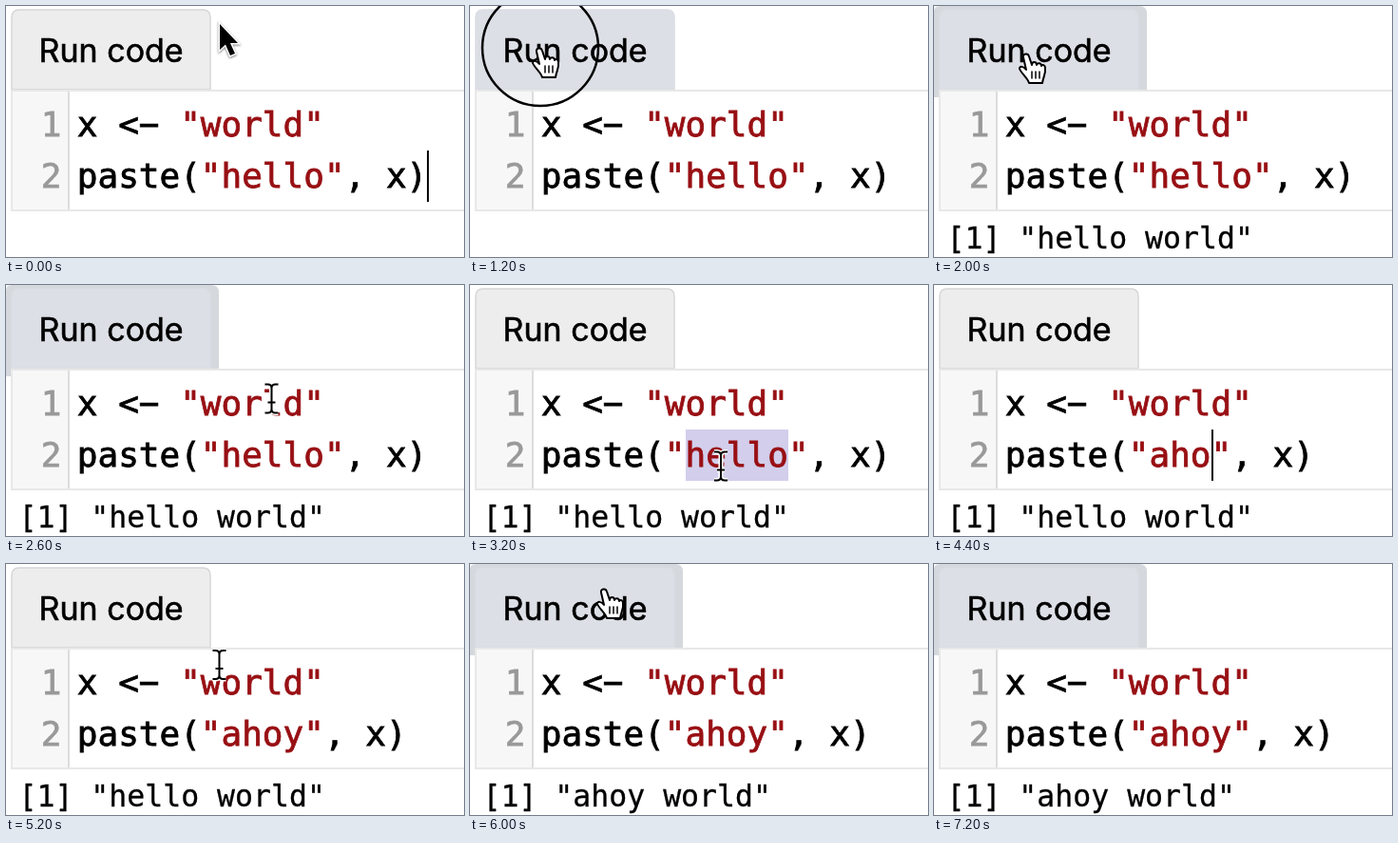
These frames come from a looping animation (482 px wide and 264 px high, 7.4 s). An HTML page:

```html
<!DOCTYPE html>
<html lang="en">
<head>
<meta charset="utf-8">
<title>Run code</title>
<style>
  html, body { margin: 0; width: 100%; height: 100%; overflow: hidden; background: #fff; }
  svg { display: block; width: 482px; height: 264px; }
  text { white-space: pre; font: 36px "DejaVu Sans Mono", monospace; stroke: #000; stroke-width: 0.8; }
  .label { font: 34px Inter, sans-serif; stroke-width: 0.6; }
  .num { fill: #999; stroke: #999; }
  .str { fill: #981014; stroke: #981014; }
  .out { font-size: 31.5px; stroke-width: 0.3; }
  .halo { fill: none; stroke: #fff; stroke-width: 5; }
  .line { fill: none; stroke: #000; stroke-width: 2; }
  #arrow { paint-order: stroke; filter: drop-shadow(0 1px 1px #0008); }
</style>
</head>
<body>
<svg viewBox="0 0 482 264">
  <defs>
    <path id="beam" d="M-7-15H-4Q0-15 0-11Q0-15 4-15H7M0-11V11M-7 15H-4Q0 15 0 11Q0 15 4 15H7M-4 4H4"/>
  </defs>

  <path id="ring" d="M0 96V6Q0 0 6 0H216Q224 0 224 8V96Z" fill="#d5d8dc"/>
  <path id="button" d="M6 88V12Q6 4 14 4H207Q215 4 215 12V88Z" stroke-width="1.500"/>
  <text class="label" x="34.600" y="59">Run code</text>

  <rect x="5" y="88" width="477" height="128" fill="#e8e8e8"/>
  <rect x="7" y="90" width="475" height="124" fill="#fff"/>
  <rect x="7" y="90" width="58" height="124" fill="#f7f7f7"/>
  <rect x="65" y="90" width="2" height="124" fill="#ddd"/>
  <text class="num" x="36.700" y="136.500">1</text>
  <text class="num" x="36.700" y="190.500">2</text>

  <rect id="selection" x="227" y="152" width="108" height="54" fill="#d2ceec"/>
  <text x="74.800" y="136.500">x &lt;− <tspan class="str">"world"</tspan></text>
  <text x="74.800" y="190.500">paste(<tspan class="str" id="word"></tspan>, x)</text>
  <rect id="caret" y="152" width="2" height="54"/>
  <text class="out" id="output" x="13.500" y="255"></text>

  <g id="pointer">
    <path id="arrow" d="M0 0V27L6 21.500L11 33L16 31L11 20H19Z" stroke="#fff" stroke-width="3"/>
    <g id="hand" stroke="#000" stroke-width="2" stroke-linejoin="round" stroke-linecap="round">
      <path fill="#fff" d="M-4 4C-5 0 1-1 2 3L5 12C5 8 10 8 10 12C11 9 15 10 15 13C16 11 19 12 19 15C20 21 17 24 16 31H2C1 26-6 21-8 16C-8 13-4 13-1 17Z"/>
      <path fill="none" stroke-width="1.500" d="M5 19V26M9 19V26M13 19V26"/>
    </g>
    <g id="ibeam"><use href="#beam" class="halo"/><use href="#beam" class="line"/></g>
    <circle id="click" r="61" fill="none" stroke="#000" stroke-width="2.500"/>
  </g>
</svg>
<script>
const LOOP = 7400, STEP = 200;
const CHAR = 21.67, CODE_X = 75.5;
const el = id => document.getElementById(id);
const show = (id, on) => el(id).setAttribute("visibility", on ? "visible" : "hidden");
const within = (t, from, to) => t >= from && t < to;

// Pointer path: [time, x, y]
const path = [
  [0, 225, 19], [200, 190, 25], [400, 105, 40], [600, 74, 44], [1800, 74, 44],
  [2000, 98, 50], [2200, 170, 72], [2400, 250, 106], [2600, 279.5, 119.5],
  [2800, 269, 168], [3000, 264, 190.5], [4800, 264, 190.5],
  [5000, 258, 172], [5200, 224.5, 106], [5400, 166, 46], [5600, 142, 26],
  [6800, 142, 26], [7000, 156, 23], [7400, 156, 23]
];

function pointerAt(t) {
  const i = Math.max(1, path.findIndex(p => p[0] >= t));
  const [t0, x0, y0] = path[i - 1], [t1, x1, y1] = path[i];
  const k = (t - t0) / (t1 - t0);
  return [x0 + (x1 - x0) * k, y0 + (y1 - y0) * k];
}

function typed(t) {
  if (t < 4000) return "hello";
  return "ahoy".slice(0, t < 4400 ? 1 : t < 4600 ? 3 : 4);
}

function draw(time) {
  const t = Math.floor(time % LOOP / STEP) * STEP;
  const [x, y] = pointerAt(t);
  const word = typed(t);

  const lit = within(t, 200, 3200) || t >= 5400;
  el("button").setAttribute("fill", lit ? "#dcdfe5" : "#ededed");
  el("button").setAttribute("stroke", lit ? "#dadde3" : "#d6d6d6");
  show("ring", within(t, 1400, 3200) || t >= 6000);

  el("word").textContent = `"${word}"`;
  show("selection", within(t, 3200, 4000));
  el("caret").setAttribute("x", Math.floor(CODE_X + CHAR * (t < 4000 ? 17 : 7 + word.length)));
  show("caret", t < 400 || t === 1000 || within(t, 4000, 5000));

  const greeting = t < 6000 ? "hello" : "ahoy";
  el("output").textContent = t < 1400 ? "" : `[1] "${greeting} world"`;

  const visible = !within(t, 4000, 5000) && t < 7200;
  const overButton = x < 216 && y < 88;
  const overCode = y >= 88;
  el("pointer").setAttribute("transform", `translate(${x} ${y})`);
  show("hand", visible && overButton);
  show("ibeam", visible && overCode);
  show("arrow", visible && !overButton && !overCode);
  show("click", t === 1200 || t === 3000 || t === 5800);
}

let start;
function tick(now) {
  start ??= now;
  draw(now - start);
  requestAnimationFrame(tick);
}
draw(0);
requestAnimationFrame(tick);
</script>
</body>
</html>
```
